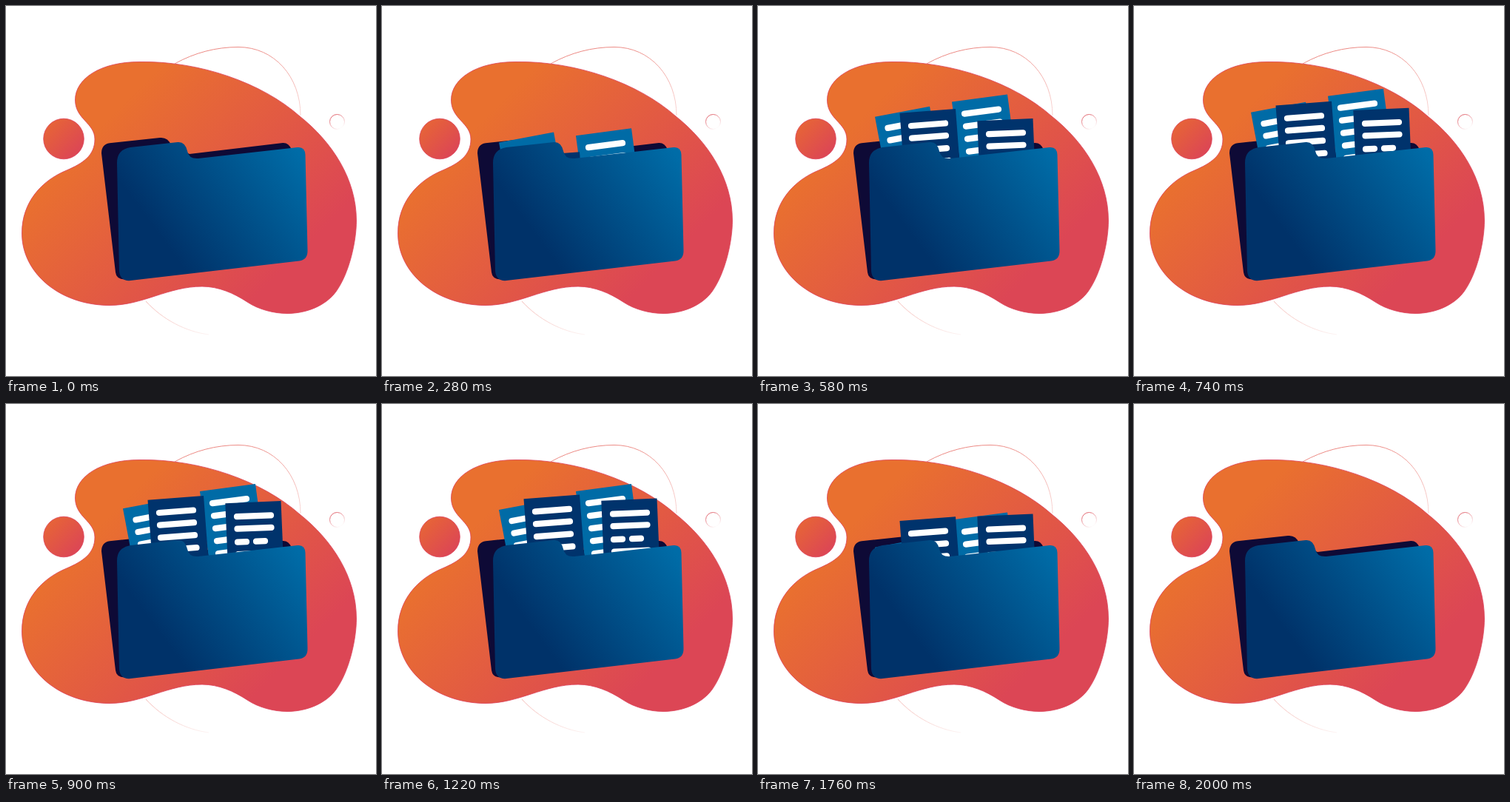
Animation, 500 px wide and 500 px high, one loop 2.02 s. Source, as an HTML page:

```html
<!DOCTYPE html>
<html lang="en">
<head>
<meta charset="utf-8">
<title>Folder</title>
<style>
  html, body { margin: 0; width: 100%; height: 100%; overflow: hidden; background: #fff; }
  svg { display: block; width: 100vw; height: 100vh; }
  .sheet path { fill: none; stroke: #fff; stroke-width: 8.2; stroke-linecap: round; }
</style>
</head>
<body>
<svg viewBox="0 0 500 500">
  <defs>
    <linearGradient id="warm" gradientUnits="userSpaceOnUse" x1="145" y1="145" x2="365" y2="365">
      <stop offset="0" stop-color="#e9702f"/><stop offset="1" stop-color="#dc4655"/>
    </linearGradient>
    <linearGradient id="dot" x1=".15" y1=".15" x2=".85" y2=".85">
      <stop offset="0" stop-color="#e66338"/><stop offset="1" stop-color="#dc4655"/>
    </linearGradient>
    <linearGradient id="front" gradientUnits="userSpaceOnUse" x1="215" y1="320" x2="390" y2="190">
      <stop offset="0" stop-color="#003269"/><stop offset="1" stop-color="#006ca7"/>
    </linearGradient>
    <linearGradient id="arc" gradientUnits="userSpaceOnUse" x1="310" y1="55" x2="330" y2="150">
      <stop offset="0" stop-color="#ec8a84"/><stop offset="1" stop-color="#f8d2d0"/>
    </linearGradient>
    <linearGradient id="tail" gradientUnits="userSpaceOnUse" x1="190" y1="400" x2="274" y2="444">
      <stop offset="0" stop-color="#f4bdb9"/><stop offset="1" stop-color="#fdf4f3"/>
    </linearGradient>
    <linearGradient id="ring" x1=".2" y1=".1" x2=".75" y2=".95">
      <stop offset="0" stop-color="#e0606a"/><stop offset="1" stop-color="#fff"/>
    </linearGradient>
  </defs>

  <g fill="none">
    <path stroke="url(#arc)" d="M228 78C255 63 284 55.500 314 55.500C362 55.500 398 95 398 148"/>
    <path stroke="url(#tail)" d="M189 399C212 424 243 440 274 444"/>
    <circle cx="447.5" cy="156.5" r="10" stroke="url(#ring)"/>
  </g>
  <g stroke="#dc3f58" stroke-width=".8">
    <path fill="url(#warm)" d="M93.500 127C93.500 98 128 75.500 180 75.500C260 74 345 103 397 149C441 184 473.500 234 473.500 290C473.500 318 464 361 446 386C432 405 406 415.500 380 415.500C362 415.500 341 410 326 400C308 388 287 379 265 379C219 379 185 404.500 140 404.500C74 404.500 21.500 362 21.500 307C21.500 265 48 236 82 222C104 212.500 120 202 120 180C120 158 93.500 153 93.500 127Z"/>
    <circle fill="url(#dot)" cx="78" cy="179.500" r="27.300"/>
  </g>

  <path fill="#0e0a36" d="M129 199Q129 187 140 185.200L208 178Q219 177 223 188L248 200L374 185Q382 184.500 386 194L390 300L160 369.500Q149 369 148 360Z"/>
  <g id="sheets"></g>
  <path fill="url(#front)" d="M150 212Q150 194 168 191L232 184Q242 183 245 196Q247 207 260 206L394 191Q404 190 404.500 201L407.500 330Q408 343 396 344.500L166 371.200Q154 371 153 358Z"/>
</svg>
<script>
  const LOOP = 2020, STEP = 20, START = 200;
  const LIGHT = '#006ba6', DARK = '#00336c';

  // Listed back to front; x, y is the top left corner at full height,
  // w, rise the top edge, peak the time of full height.
  const sheets = [
    { x: 158, y: 140.8, w: 74, rise: 14, peak: 1000, fill: LIGHT,
      lines: 'M175.500 156l45-8.500M178.500 172.500l45-8.500M182 189l45-8.500' },
    { x: 262, y: 117, w: 75, rise: 10, peak: 1060, fill: LIGHT,
      lines: 'M279 133l46-6M281 150l46-6M283 167l46-6M285 184l46-6M287 201l46-6' },
    { x: 191.5, y: 127.8, w: 75.5, rise: 5.7, peak: 1115, fill: DARK,
      lines: 'M207 145l46-3.500M208 161.700l46-3.500M209 178.700l46-3.500M210.500 195.700l47-3.700' },
    { x: 296.3, y: 130.7, w: 75.2, rise: 3.2, peak: 1185, fill: DARK,
      lines: 'M312 148.500l46-1.800M312.500 165l46-1.800M313 183l12-.5M338 182l12-.5M314 199.500l46-2' }
  ];

  const DEPTH = 100;
  const svgGroup = document.getElementById('sheets');
  svgGroup.innerHTML = sheets.map(({ x, y, w, rise, fill, lines }) => {
    const lean = DEPTH * rise / w;
    const corners = [[x, y], [x + w, y - rise], [x + w + lean, y - rise + DEPTH], [x + lean, y + DEPTH]];
    return `<g class="sheet"><polygon fill="${fill}" points="${corners.join(' ')}"/><path d="${lines}"/></g>`;
  }).join('');
  const nodes = [...svgGroup.children];

  // Distance below full height, equal on the way up and down.
  const drop = u => 4.2e-5 * u ** 2 + 1.13e-13 * Math.abs(u) ** 5;

  function draw(time) {
    const t = Math.floor(time % LOOP / STEP) * STEP;
    sheets.forEach((sheet, i) => {
      const d = drop(t - sheet.peak);
      // Fully lowered sheets would reach past the folder, so they are hidden.
      const hidden = t < START || t >= LOOP - STEP || d > 95;
      nodes[i].setAttribute('visibility', hidden ? 'hidden' : 'visible');
      nodes[i].setAttribute('transform', `translate(0 ${d.toFixed(2)})`);
    });
  }

  let origin;
  function tick(now) {
    origin ??= now;
    draw(now - origin);
    requestAnimationFrame(tick);
  }
  draw(0);
  requestAnimationFrame(tick);
</script>
</body>
</html>
```
